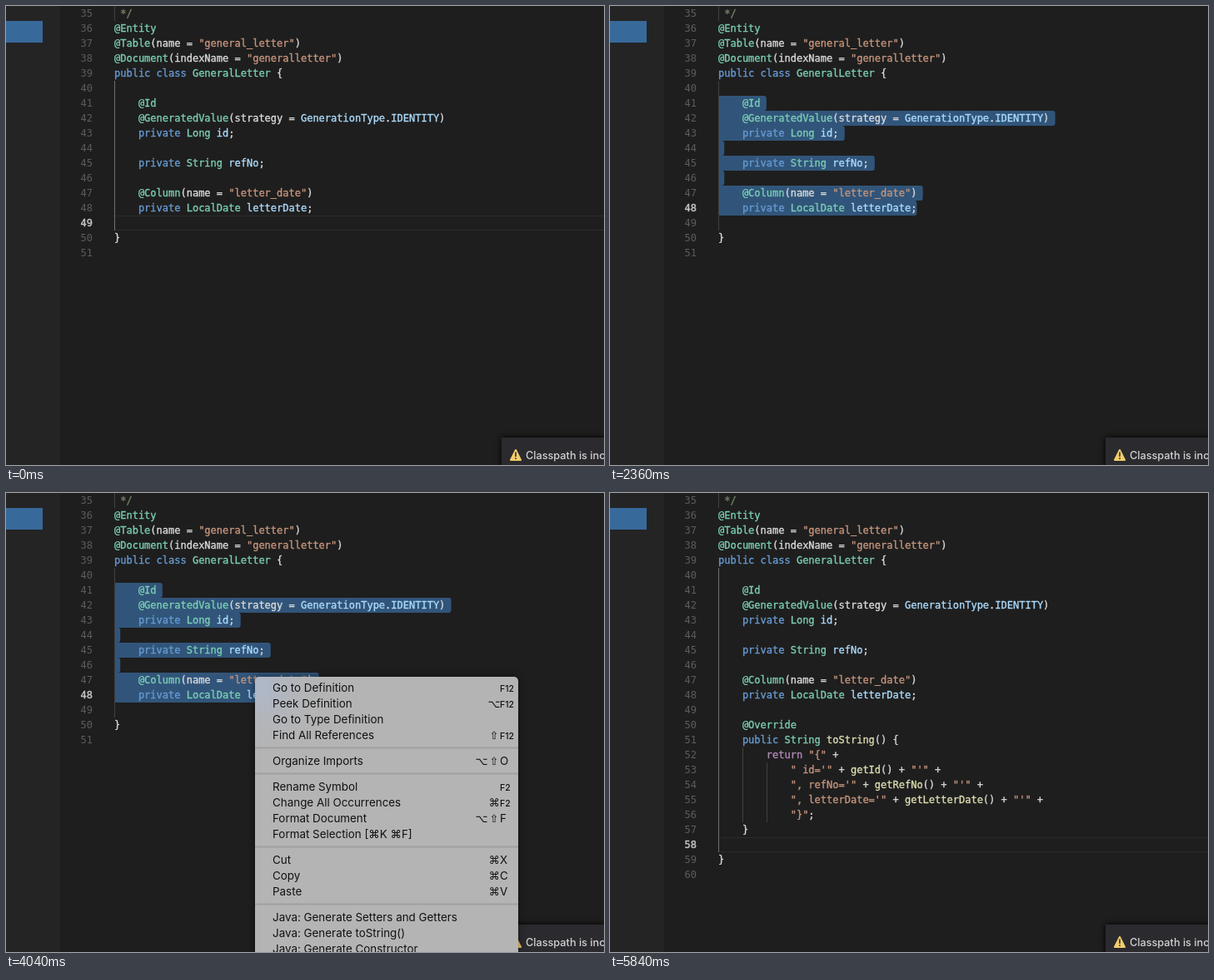
Animation of 718 by 552 pixels, one loop 5880 ms. Source, as an HTML page with a canvas:

```html
<!DOCTYPE html>
<html>
<head>
<meta charset="utf-8">
<style>
html, body { margin: 0; width: 100%; height: 100%; overflow: hidden; background: #1e1e1e; }
canvas { display: block; }
</style>
</head>
<body>
<canvas id="stage" width="718" height="552"></canvas>
<script>
const ctx = document.getElementById('stage').getContext('2d');
const LOOP = 5880, LEFT = 130, CHAR = 7.224, ROW = 18, FIRST = 35;
const MONO = '"DejaVu Sans Mono", monospace', SANS = 'Inter, sans-serif';

const before = ` */
@Entity
@Table(name = "general_letter")
@Document(indexName = "generalletter")
public class GeneralLetter {

    @Id
    @GeneratedValue(strategy = GenerationType.IDENTITY)
    private Long id;

    private String refNo;

    @Column(name = "letter_date")
    private LocalDate letterDate;

}
`.split('\n');
const method = `    @Override
    public String toString() {
        return "{" +
            " id='" + getId() + "'" +
            ", refNo='" + getRefNo() + "'" +
            ", letterDate='" + getLetterDate() + "'" +
            "}";
    }
`.split('\n');
const after = [...before.slice(0, 15), ...method, ...before.slice(15)];

const menu = [
  ['Go to Definition', '', 'F12'], ['Peek Definition', '⌥', 'F12'],
  ['Go to Type Definition', '', ''], ['Find All References', '⇧', 'F12'], null,
  ['Organize Imports', '⌥⇧', 'O'], null,
  ['Rename Symbol', '', 'F2'], ['Change All Occurrences', '⌘', 'F2'],
  ['Format Document', '⌥⇧', 'F'], ['Format Selection [⌘K ⌘F]', '', ''], null,
  ['Cut', '', ''], ['Copy', '', ''], ['Paste', '', ''], null,
  ['Java: Generate Setters and Getters', '', ''], ['Java: Generate toString()', '', ''],
  ['Java: Generate Constructor', '', '']
];
['X', 'C', 'V'].forEach((key, i) => { menu[12 + i][1] = '⌘'; menu[12 + i][2] = key; });

const palette = [
  [/^"/, '#c5947c'],
  [/^(@.*|GeneralLetter|Long|String|LocalDate)$/, '#7bcdb4'],
  [/^(public|private|class)$/, '#679ad1'],
  [/^return$/, '#b089b8'],
  [/^(get\w+|toString)$/, '#dcdcaf'],
  [/^(id|refNo|letterDate|GenerationType|IDENTITY)$/, '#aadafa'],
  [/^\*\/$/, '#748468']
];
const colorOf = token => (palette.find(([rule]) => rule.test(token)) || [0, '#dadada'])[1];
const rowTop = line => (line - FIRST) * ROW;
const colX = col => LEFT + col * CHAR;
const clamp = v => Math.max(0, Math.min(1, v));
const ease = v => v * v * (3 - 2 * v);

function box(x, y, w, h, color, radius = 0) {
  ctx.fillStyle = color;
  ctx.beginPath();
  ctx.roundRect(x, y, w, h, radius);
  ctx.fill();
}

function text(s, x, y, color, font, align = 'left', weight = 0) {
  ctx.font = font;
  ctx.textAlign = align;
  ctx.fillStyle = ctx.strokeStyle = color;
  ctx.fillText(s, x, y);
  if (weight) {
    ctx.lineWidth = weight;
    ctx.strokeText(s, x, y);
  }
}

function track(keys, t) {
  if (t <= keys[0][0]) return keys[0][1];
  for (let i = 1; i < keys.length; i++) {
    const [t0, v0] = keys[i - 1], [t1, v1] = keys[i];
    if (t < t1) return v0 + (v1 - v0) * ease((t - t0) / (t1 - t0));
  }
  return keys[keys.length - 1][1];
}

// Caret, selection anchor and time of the last caret move
function editorState(t) {
  if (t < 880) return { line: 49, col: 4, since: -640 };
  if (t < 1400) return { line: 41, col: 7, since: 880, word: true };
  if (t < 5240) {
    const p = ease(clamp((t - 1400) / 440));
    const line = 41 + Math.round(7 * p);
    const col = Math.min(before[line - FIRST].length, Math.round(33 * p));
    return { line, col, since: t < 1840 ? t : 1840, block: true };
  }
  return { line: 58, col: 4, since: 5240 };
}

function drawSelection(s) {
  const color = '#31557a';
  if (s.word) {
    const mark = (line, col, fill) => box(colX(col), rowTop(line), 2 * CHAR, ROW, fill, 2);
    mark(41, 5, color);
    mark(42, before[7].indexOf('IDENTITY'), '#464849');
    mark(43, before[8].indexOf('id;'), '#464849');
  }
  if (!s.block) return;
  for (let line = 41; line <= s.line; line++) {
    const end = line < s.line ? before[line - FIRST].length + 1 : s.col;
    box(LEFT, rowTop(line), end * CHAR, ROW, color, [0, 3, 3, line === s.line ? 3 : 0]);
  }
}

function drawEditor(t) {
  const s = editorState(t), done = t >= 5240;
  const lines = done ? after : before;
  const plain = !s.word && !s.block;
  box(0, 0, 718, 552, '#1e1e1e');
  box(0, 0, 65, 552, '#242425');
  box(-2, 18, 46, 26, '#37699a');

  if (plain) {
    box(LEFT, rowTop(s.line), 588, 1, '#2b2b2b');
    box(LEFT, rowTop(s.line) + 17, 588, 1, '#2b2b2b');
  }
  drawSelection(s);

  const guide = (x, from, to, color = '#404040') =>
    box(x, rowTop(from), 1, (to - from) * ROW, color);
  guide(130, 35, 36);
  guide(130, 40, done ? 59 : 50, plain ? '#707070' : '#404040');
  if (done) {
    guide(159, 52, 57);
    guide(188, 53, 57);
  }

  lines.forEach((source, i) => {
    const line = FIRST + i, y = rowTop(line) + 13;
    const current = line === s.line;
    text(line, 104, y, current ? '#c6c6c6' : '#5c5c5c', '12px ' + MONO, 'right', current ? 0.4 : 0);
    for (const m of source.matchAll(/"[^"]*"|\*\/|@?\w+|\S/g))
      text(m[0], colX(m.index), y, colorOf(m[0]), '12px ' + MONO, 'left', 0.35);
  });

  if ((t - s.since) % 1000 < 500)
    box(colX(s.col), rowTop(s.line), 2, ROW, '#b8b8b0');
}

function drawToast() {
  ctx.save();
  ctx.shadowColor = '#000';
  ctx.shadowBlur = 7;
  box(595, 519, 130, 40, '#2b2b2f');
  ctx.restore();
  ctx.beginPath();
  ctx.moveTo(612, 534);
  ctx.lineTo(618, 546);
  ctx.lineTo(606, 546);
  ctx.closePath();
  ctx.fillStyle = ctx.strokeStyle = '#f3cd6a';
  ctx.lineWidth = 2;
  ctx.lineJoin = 'round';
  ctx.fill();
  ctx.stroke();
  box(611.2, 536.5, 1.6, 5.5, '#2b2b2f');
  box(611.2, 543.3, 1.6, 1.7, '#2b2b2f');
  text('Classpath is incomplete.', 624, 545, '#d2d2d2', '500 12.7px ' + SANS);
}

function drawMenu(t) {
  if (t < 2720 || t >= 4820) return;
  const pointer = track([[2900, 226], [3400, 460], [3800, 460], [4240, 529]], t);
  ctx.save();
  ctx.globalAlpha = t < 4680 ? 1 : t < 4800 ? 1 - 0.97 * (t - 4680) / 120 : 0.03;
  ctx.save();
  ctx.shadowColor = 'rgba(0,0,0,.5)';
  ctx.shadowBlur = 10;
  box(299, 221, 316, 345, '#b4b4b4', 5);
  ctx.restore();
  const tint = ctx.createRadialGradient(305, 235, 5, 305, 235, 85);
  tint.addColorStop(0, 'rgba(172,186,208,.7)');
  tint.addColorStop(1, 'rgba(180,180,180,0)');
  box(299, 221, 100, 100, tint, [5, 0, 0, 0]);

  let y = 224.5;
  for (const item of menu) {
    if (!item) {
      box(299, y + 5, 316, 2, '#a0a0a0');
      y += 12;
      continue;
    }
    const [label, mods, key] = item;
    const active = t > 2940 && pointer >= y && pointer < y + 19;
    const color = active ? '#fff' : '#111';
    if (active) box(299, y + 0.5, 316, 19, '#2560c0');
    const base = y + 14.5;
    text(label, 320, base, color, '13.4px Inter, "DejaVu Sans", sans-serif');
    [...mods].reverse().forEach((mod, i) =>
      text(mod, 586 - 15 * i, base, color, '13px "DejaVu Sans", sans-serif', 'center'));
    text(key, 593, base, color, (key.length > 1 ? '500 10.5px ' : '13.4px ') + SANS);
    y += 19;
  }
  ctx.restore();
}

function frame(now) {
  const t = now % LOOP;
  drawEditor(t);
  drawToast();
  drawMenu(t);
  requestAnimationFrame(frame);
}
requestAnimationFrame(frame);
</script>
</body>
</html>
```
